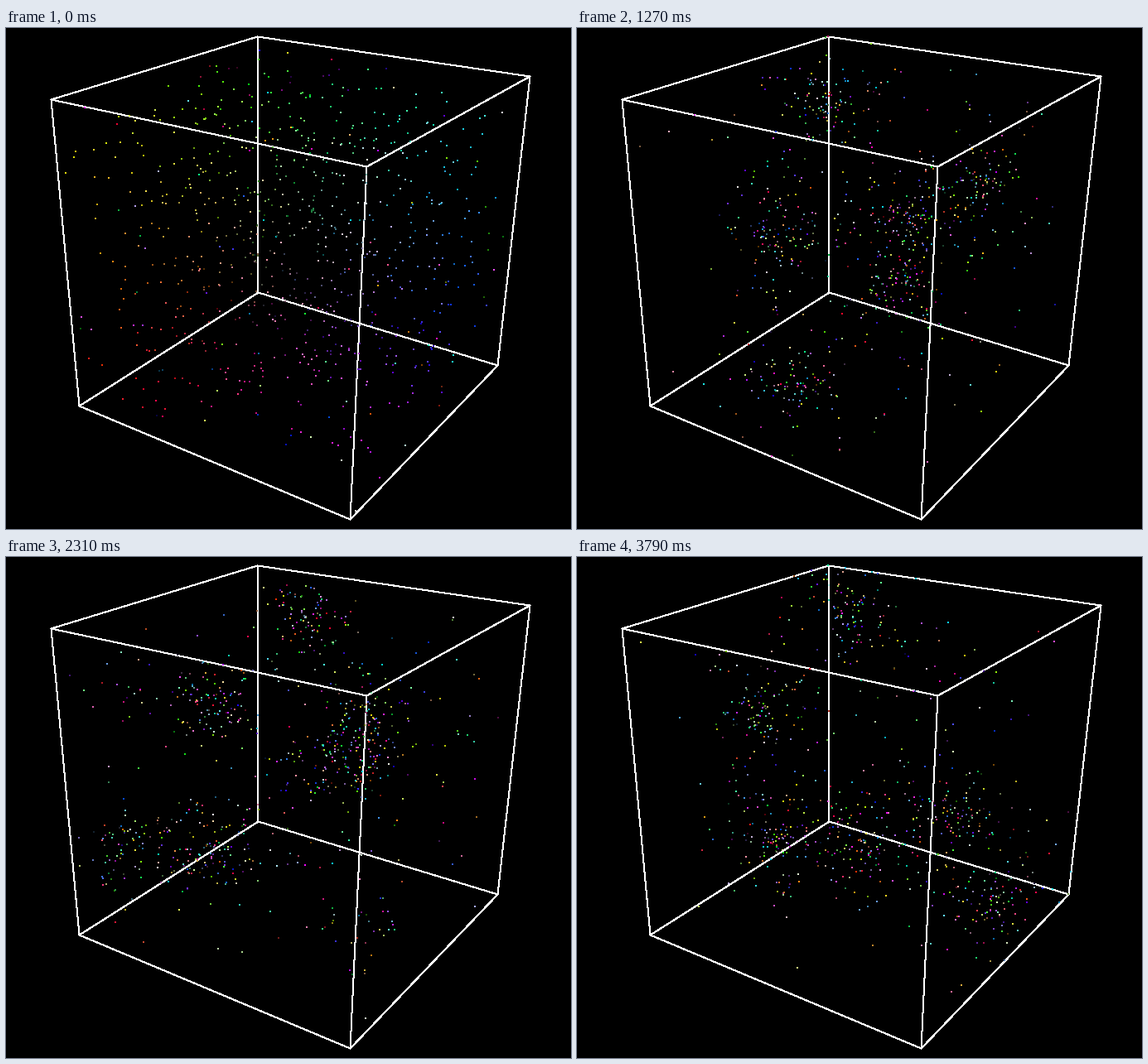
These frames come from a looping animation (682x605 px, 3.82 s). A matplotlib script:

```python
import itertools

import matplotlib.pyplot as plt
import numpy as np
from matplotlib.animation import FuncAnimation

W, H, DPI = 682, 605, 100
LOOP, TICK = 3820, 10          # ms
COUNT, FLOCKS, SIZE = 800, 6, 113
SPEED = 0.03                   # cube sides per step

# Cube corners and where each one appears on the screen
CUBE = np.array(list(itertools.product((0, 1), repeat=3)))
SCREEN = np.array([(304, 319), (593, 407), (303, 10), (632, 58),
                   (88, 456), (415, 593), (54, 86), (435, 167)])

# The simulation advances in uneven steps of 30 or 40 ms
STEP_AT = [0, 18, 35, 53, 62, 70, 88, 106, 122, 123]
STEP_MS = [0, 560, 1090, 1630, 1900, 2160, 2700, 3290, 3790, LOOP]

# Flock centres on the screen at chosen steps
GATHERINGS = {
    15: [(290, 105), (545, 160), (205, 200), (330, 250), (310, 380), (450, 270)],
    41: [(298, 92), (480, 185), (400, 235), (385, 305), (245, 250), (260, 430)],
    62: [(185, 225), (380, 200), (415, 320), (235, 400), (320, 375), (535, 110)],
    88: [(340, 90), (430, 115), (360, 200), (250, 180), (180, 360), (260, 300)],
    106: [(260, 225), (360, 250), (505, 210), (515, 290), (275, 350), (180, 110)],
    122: [(330, 70), (220, 190), (240, 335), (340, 350), (460, 315), (505, 415)],
}

rng = np.random.default_rng(7)


def fit_camera():
    """3x4 projection matrix that sends the unit cube to its corners."""
    rows = []
    for corner, xy in zip(CUBE, SCREEN):
        p = np.append(corner, 1)
        for axis, value in enumerate(xy / W):
            row = np.zeros((3, 4))
            row[axis] = p
            row[2] = -value * p
            rows.append(row.ravel())
    cam = np.linalg.svd(np.array(rows))[2][-1].reshape(3, 4)
    return np.diag([W, W, 1]) @ cam


CAM = fit_camera()
LENS, BASE = CAM[:, :3], CAM[:, 3]
INV = np.linalg.inv(LENS)
EYE = -INV @ BASE


def project(p):
    q = p @ LENS.T + BASE
    return q[:, :2] / q[:, 2:]


def unproject(xy, depth):
    """Point inside the cube seen at xy, at a fraction of the ray's way through."""
    ray = np.c_[xy, np.ones(len(xy))] @ INV.T
    a, b = -EYE / ray, (1 - EYE) / ray
    enter = np.minimum(a, b).max(axis=1)
    leave = np.maximum(a, b).min(axis=1)
    t = enter + depth * (leave - enter)
    return np.clip(EYE + t[:, None] * ray, 0, 0.999)


def unit(v):
    return v / np.linalg.norm(v, axis=1, keepdims=True)


# Strays form flocks of one
group = np.arange(COUNT) // SIZE
flocked = group < FLOCKS
group[~flocked] = FLOCKS + np.arange((~flocked).sum())
members = np.bincount(group)
SHIFTS = np.array(list(itertools.product((-1, 0, 1), repeat=3)))


def flock_mean(v):
    return np.stack([np.bincount(group, c) / members for c in v.T], axis=1)[group]


def wrap_shift(move, want):
    """Periodic image of each move that best continues the wanted one."""
    gap = move[:, None] + SHIFTS - want[:, None]
    return SHIFTS[(gap ** 2).sum(axis=2).argmin(axis=1)]


def targets(centres, spread):
    goal = rng.random((COUNT, 3))
    g = group[flocked]
    reach = spread * rng.uniform(0.3, 1.5, (len(g), 1))
    xy = np.array(centres)[g] + reach * rng.normal(size=(len(g), 2))
    depth = rng.uniform(0.2, 0.8, FLOCKS)[g] + rng.normal(0, 0.12, len(g))
    goal[flocked] = unproject(xy, np.clip(depth, 0, 1))
    return goal


def plan():
    """Unwrapped positions of all particles at each gathering."""
    heading = unit(rng.normal(size=(COUNT, 3)))
    path = [(home + 3 * SPEED * heading) % 1]
    last = 0
    for step, centres in GATHERINGS.items():
        move = targets(centres, 38 if last else 55) - path[-1] % 1
        want = SPEED * (step - last) * heading
        if last:
            # Flocks cross the walls together
            move += wrap_shift(flock_mean(move), want)
            heading = unit(flock_mean(move))
        else:
            move += wrap_shift(move, want)
            heading = unit(rng.normal(size=(len(members), 3)))[group]
        path.append(path[-1] + move)
        last = step
    return np.array(path)


home = rng.random((COUNT, 3))
KEYS = np.array([0, *GATHERINGS])
PATH = plan()
TANGENT = np.gradient(PATH, KEYS, axis=0)


def position(step):
    """Cubic Hermite path between gatherings, wrapped into the cube."""
    k = min(np.searchsorted(KEYS, step, side="right") - 1, len(KEYS) - 2)
    span = KEYS[k + 1] - KEYS[k]
    s = (step - KEYS[k]) / span
    ease = s * s * (3 - 2 * s)
    p = PATH[k] + ease * (PATH[k + 1] - PATH[k])
    p += span * s * (1 - s) * ((1 - s) * TANGENT[k] - s * TANGENT[k + 1])
    return p % 1


fig = plt.figure(figsize=(W / DPI, H / DPI), dpi=DPI, facecolor="black")
ax = fig.add_axes([0, 0, 1, 1])
ax.set_xlim(0, W)
ax.set_ylim(H, 0)
ax.axis("off")

PX = 72 / DPI
for i, j in itertools.combinations(range(len(CUBE)), 2):
    if np.abs(CUBE[i] - CUBE[j]).sum() == 1:
        ax.plot(*(SCREEN[[i, j]].T + 0.5), color="white", lw=PX, antialiased=False)

# Each particle keeps the colour of the place it started from
dots = ax.scatter(*np.zeros((2, COUNT)), s=(2 * PX) ** 2, c=home, marker="s",
                  linewidths=0, antialiased=False, zorder=3)


def update(frame):
    step = int(np.interp(frame * TICK, STEP_MS, STEP_AT) + 1e-6)
    dots.set_offsets(np.round(project(position(step))))
    return [dots]


anim = FuncAnimation(fig, update, frames=LOOP // TICK, interval=TICK,
                     init_func=lambda: update(0), repeat=True, repeat_delay=0)
plt.show()
```
